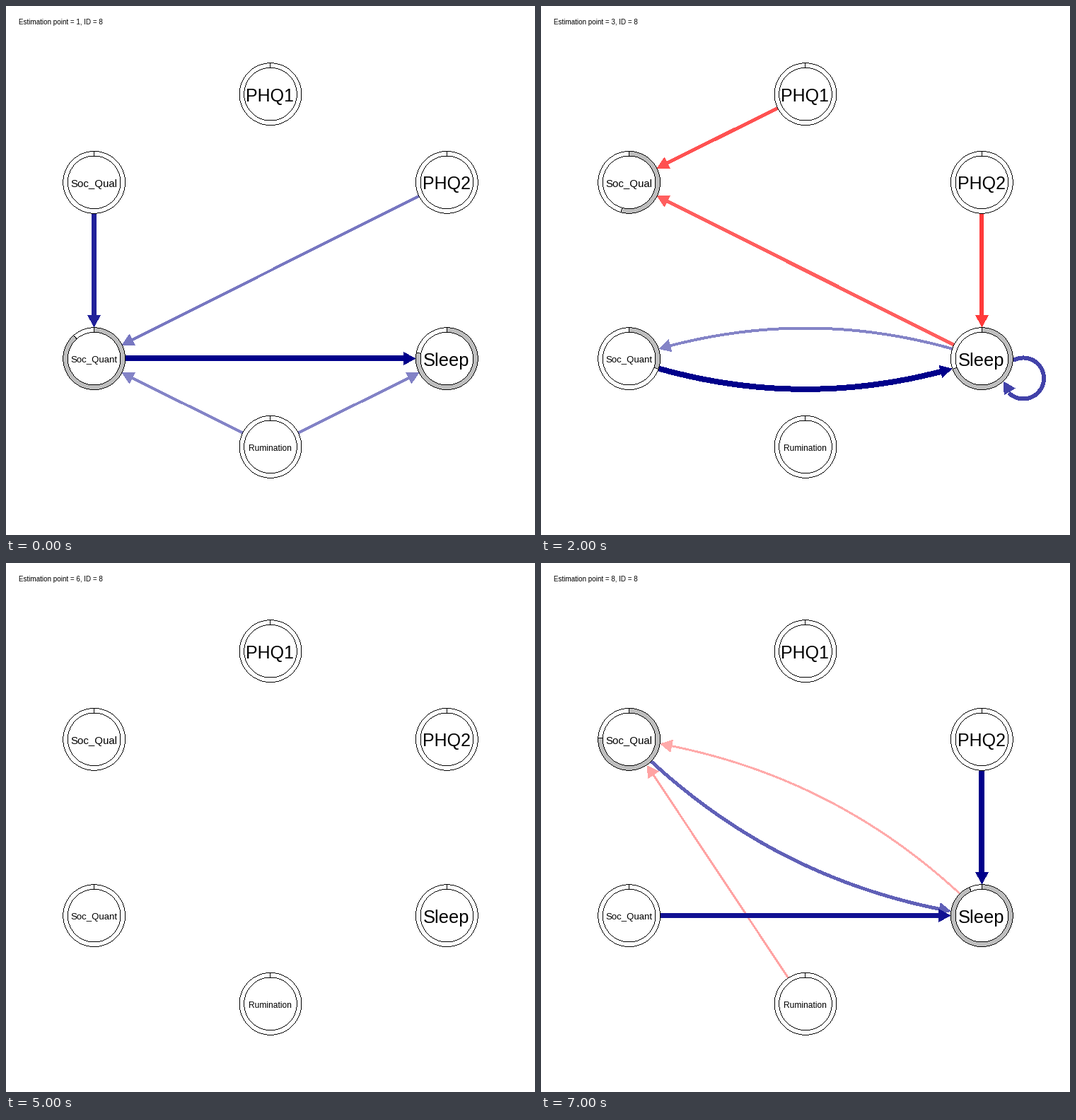
A matplotlib script that plays this animation: 748x748 px, repeating every 8000 ms.

```python
import numpy as np
import matplotlib.pyplot as plt
from matplotlib.animation import FuncAnimation
from matplotlib.path import Path

SIZE = 748
DPI = 100
PX = 72 / DPI              # points per pixel
R_OUT = 43.9               # node ring radii
R_IN = .85 * R_OUT
HEAD_LEN, HEAD_HALF = 17.3, 9.5
SHAFT_GAP = HEAD_LEN - 4   # the shaft stops this far before the tip
BEND_ANGLE = np.radians(18.4)
FONT = "Liberation Sans"

NAVY = np.array([0, 0, 139]) / 255
RED = np.array([1.0, 0.0, 0.0])
GREY = 190 / 255

LEFT, MID, RIGHT = SIZE / 6, SIZE / 2, SIZE * 5 / 6
# name: (x, y, font size in px)
NODES = {
    "PHQ1": (MID, SIZE / 6, 25),
    "PHQ2": (RIGHT, SIZE / 3, 25),
    "Sleep": (RIGHT, SIZE * 2 / 3, 25.5),
    "Rumination": (MID, SIZE * 5 / 6, 12),
    "Soc_Quant": (LEFT, SIZE * 2 / 3, 13.2),
    "Soc_Qual": (LEFT, SIZE / 3, 15),
}

# Each step: edges (from, to, colour, strength, kind) and ring fill per node
STEPS = [
    ([("Soc_Qual", "Soc_Quant", NAVY, .87, "line"),
      ("PHQ2", "Soc_Quant", NAVY, .53, "line"),
      ("Rumination", "Soc_Quant", NAVY, .48, "line"),
      ("Rumination", "Sleep", NAVY, .49, "line"),
      ("Soc_Quant", "Sleep", NAVY, 1, "line")],
     {"Soc_Quant": .885, "Sleep": .782}),
    ([("PHQ2", "PHQ1", RED, 1, "line"),
      ("PHQ2", "Soc_Qual", NAVY, .85, "line")],
     {"PHQ1": .443, "Soc_Qual": .235}),
    ([("PHQ1", "Soc_Qual", RED, .68, "line"),
      ("Sleep", "Soc_Qual", RED, .63, "line"),
      ("PHQ2", "Sleep", RED, .77, "line"),
      ("Sleep", "Soc_Quant", NAVY, .48, "curve"),
      ("Soc_Quant", "Sleep", NAVY, 1, "curve"),
      ("Sleep", "Sleep", NAVY, .74, "loop")],
     {"Soc_Qual": .543, "Soc_Quant": .305, "Sleep": .695}),
    ([], {}),
    ([("Soc_Qual", "PHQ1", NAVY, 1, "line"),
      ("Soc_Qual", "PHQ2", NAVY, .92, "line"),
      ("Soc_Quant", "Sleep", RED, .3, "line"),
      ("Sleep", "Sleep", NAVY, .56, "loop")],
     {"PHQ1": .566, "PHQ2": .5, "Sleep": .4}),
    ([], {}),
    ([("Rumination", "PHQ1", NAVY, 1, "line")], {"PHQ1": .294}),
    ([("Sleep", "Soc_Qual", RED, .33, "curve"),
      ("Rumination", "Soc_Qual", RED, .36, "line"),
      ("Soc_Qual", "Sleep", NAVY, .62, "curve"),
      ("Soc_Quant", "Sleep", NAVY, .93, "line"),
      ("PHQ2", "Sleep", NAVY, 1, "line")],
     {"Soc_Qual": .757, "Sleep": .934}),
]

# Pixel centres of the whole stage
GRID_X, GRID_Y = np.meshgrid(np.arange(SIZE) + .5, np.arange(SIZE) + .5)


def center(name):
    return np.array(NODES[name][:2])


def unit(v):
    return v / np.hypot(*v)


def rotate(v, angle):
    c, s = np.cos(angle), np.sin(angle)
    return np.array([c * v[0] - s * v[1], s * v[0] + c * v[1]])


def snap(p):
    """Move points to the middle of their pixel."""
    return np.floor(np.asarray(p) - .01) + .49


def paint(img, poly, color):
    """Fill a polygon with hard pixel edges."""
    x0, y0 = np.floor(np.min(poly, axis=0)).astype(int)
    x1, y1 = np.ceil(np.max(poly, axis=0)).astype(int)
    box = np.s_[y0:y1, x0:x1]
    spots = np.column_stack([GRID_X[box].ravel(), GRID_Y[box].ravel()])
    inside = Path(poly).contains_points(spots).reshape(y1 - y0, x1 - x0)
    img[box][inside] = color


def ribbon(pts, width):
    d = np.gradient(pts, axis=0)
    d /= np.hypot(*d.T)[:, None]
    side = width / 2 * np.column_stack([-d[:, 1], d[:, 0]])
    return np.vstack([pts + side, (pts - side)[::-1]])


# Each path gives the shaft points, the arrow tip and its direction.
def line_path(a, b):
    u = unit(b - a)
    start, tip = snap(a + R_OUT * u), snap(b - R_OUT * u)
    return np.array([start, tip - SHAFT_GAP * u]), tip, u


def curve_path(a, b):
    u = unit(b - a)
    start = a + R_OUT * rotate(u, BEND_ANGLE)
    tip = b + R_OUT * rotate(-u, -BEND_ANGLE)
    bend = .0865 * np.hypot(*(b - a)) * np.array([-u[1], u[0]])
    ctrl = a + b + 2 * bend - (start + tip) / 2
    t = np.linspace(0, 1, 150)[:, None]
    pts = (1 - t) ** 2 * start + 2 * t * (1 - t) * ctrl + t ** 2 * tip
    gap = np.hypot(*(pts - tip).T)
    return pts[gap > SHAFT_GAP], tip, unit(tip - pts[gap < HEAD_LEN][0])


def loop_path(c):
    turn = 2 * np.pi * np.linspace(-.07, .625, 80)
    ring = c + [58.7, 27.8] + 29 * np.column_stack([np.sin(turn), -np.cos(turn)])
    return np.vstack([c + [R_OUT, 1], ring]), c + [30.5, 32], unit([-.52, -.854])


def draw_edge(img, src, dst, base, strength, kind):
    color = 1 - strength * (1 - base)
    a, b = center(src), center(dst)
    if kind == "loop":
        shaft, tip, u = loop_path(a)
    else:
        shaft, tip, u = (line_path if kind == "line" else curve_path)(a, b)
    paint(img, ribbon(shaft, round(1 + 6.52 * strength)), color)
    side = HEAD_HALF * np.array([-u[1], u[0]])
    foot = tip - HEAD_LEN * u
    paint(img, np.array([tip, foot + side, foot - side]), color)


def draw_node(img, name, part):
    c = center(name)
    dx, dy = GRID_X - c[0], GRID_Y - c[1]
    r = np.hypot(dx, dy)
    turn = np.arctan2(dx, -dy) / (2 * np.pi) % 1
    img[r < R_OUT] = 1
    img[(r > R_IN) & (r < R_OUT) & (turn < part)] = GREY
    # One-pixel circles, stepped along the longer axis
    far = np.maximum(abs(dx), abs(dy))
    near = np.minimum(abs(dx), abs(dy))
    for radius in (R_IN, R_OUT):
        rim = np.sqrt(np.maximum(radius ** 2 - near ** 2, 0))
        img[abs(far - rim) <= .5] = 0
    for t in (0, part):
        ray = np.array([np.sin(2 * np.pi * t), -np.cos(2 * np.pi * t)])
        spots = c + np.linspace(R_IN, R_OUT, 8)[:, None] * ray
        cols, rows = np.floor(spots - .01).astype(int).T
        img[rows, cols] = 0


def render(edges, parts):
    img = np.ones((SIZE, SIZE, 3))
    for edge in edges:
        draw_edge(img, *edge)
    for name in NODES:
        draw_node(img, name, parts.get(name, 0))
    return img


fig = plt.figure(figsize=(SIZE / DPI, SIZE / DPI), dpi=DPI, facecolor="white")
ax = fig.add_axes([0, 0, 1, 1])
ax.axis("off")
pictures = [render(*step) for step in STEPS]
view = ax.imshow(pictures[0], extent=(0, SIZE, SIZE, 0),
                 interpolation="nearest", aspect="auto")
for name, (x, y, size) in NODES.items():
    ax.text(x - .5, y + .358 * size + 1, name, fontsize=size * PX,
            family=FONT, ha="center", va="baseline")
title = ax.text(18, 26, "", fontsize=9.9 * PX, family=FONT, va="baseline")


def draw(i):
    view.set_data(pictures[i])
    title.set_text(f"Estimation point = {i + 1}, ID = 8")
    return view, title


anim = FuncAnimation(fig, draw, frames=len(STEPS), interval=1000,
                     init_func=lambda: draw(0), repeat=True, repeat_delay=0)
plt.show()
```
